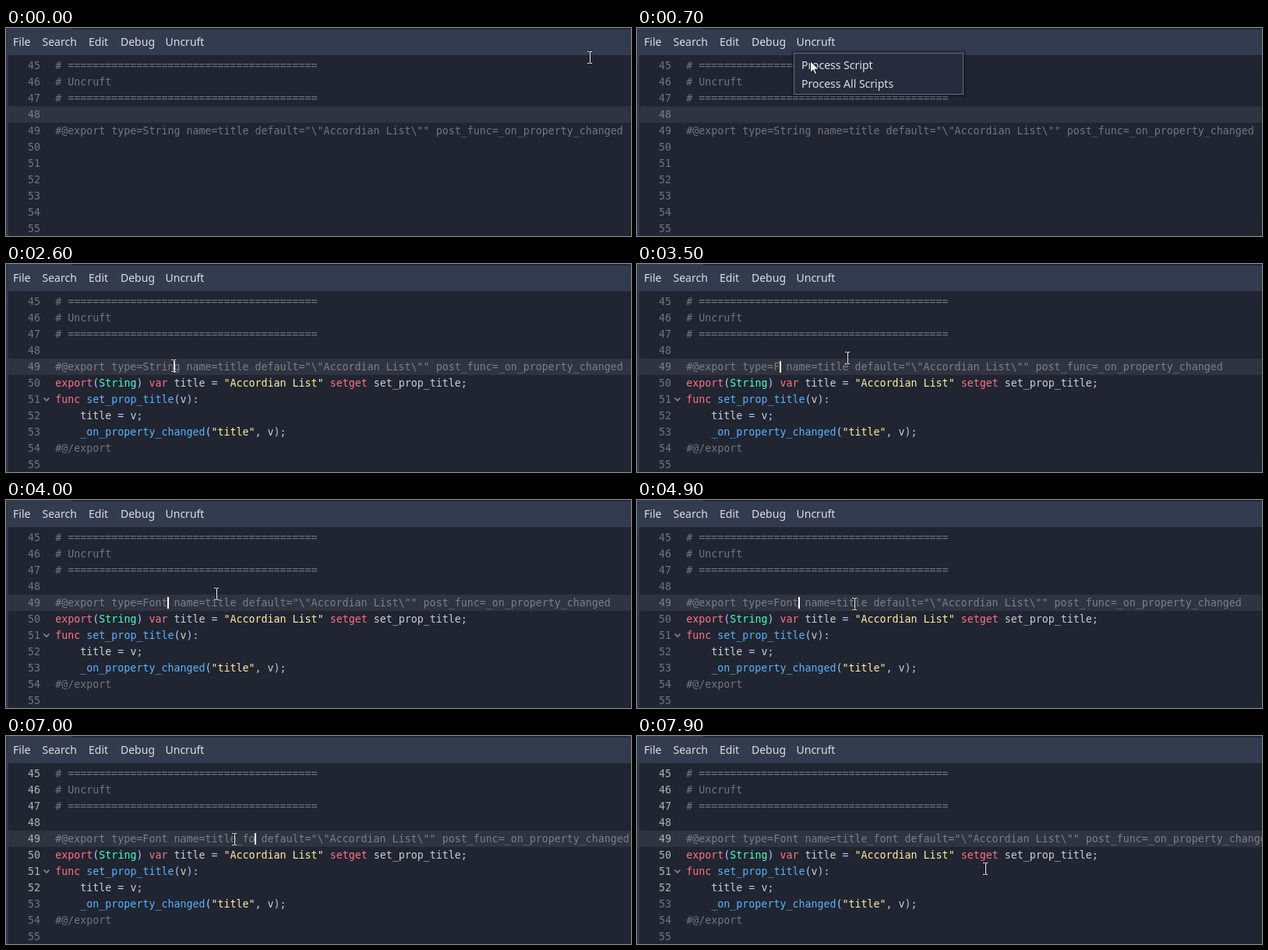
These frames come from a looping animation (802x268 px, 8000 ms). An HTML page:

```html
<!DOCTYPE html>
<html lang="en">
<head>
<meta charset="utf-8">
<title>Script editor</title>
<style>
  html, body { margin: 0; width: 100%; height: 100%; overflow: hidden; background: #202531; }
  svg { display: block; }
  text { white-space: pre; }
  .ui { font: 14px "Noto Sans", "Open Sans", sans-serif; fill: #dcdee3; }
  .code { font: 13.3px "DejaVu Sans Mono", "Liberation Mono", monospace; fill: #ccced3; }
  .num, .c { fill: #fff; fill-opacity: .37; }
  .safe { fill: #a0bca8; fill-opacity: 1; }
  .k { fill: #ff7085; }
  .t { fill: #42ffc2; }
  .f { fill: #57b3ff; }
  .s { fill: #ffeda1; }
  .y { fill: #abc9ff; }
</style>
</head>
<body>
<svg width="802" height="268" viewBox="0 0 802 268">
  <rect width="802" height="268" fill="#202531"/>
  <rect width="802" height="35" fill="#333b4f"/>
  <rect width="3" height="268" fill="#333b4f"/>
  <rect x="85" width="717" height="2" fill="#222834"/>
  <rect id="row" x="3" width="799" height="21" fill="#fff" fill-opacity=".07"/>
  <g id="marks">
    <rect x="175" y="122" width="48" height="21" fill="#699ce8" fill-opacity=".4"/>
    <rect x="119" y="143" width="48" height="21" fill="#fff" fill-opacity=".06"/>
  </g>
  <g class="ui">
    <text x="9" y="23">File</text>
    <text x="46.5" y="23">Search</text>
    <text x="106" y="23">Edit</text>
    <text x="147" y="23">Debug</text>
    <text x="204.5" y="23">Uncruft</text>
  </g>
  <g id="code" class="code"></g>
  <path id="fold" d="M48.5 172.5l3.5 3.5 3.5-3.5" fill="none" stroke="#858993" stroke-width="1.6"/>
  <rect id="caret" width="2" height="15" fill="#fff"/>
  <g id="popup" class="ui">
    <rect x="197" y="28" width="226" height="62" rx="3" fill="#000" fill-opacity=".12"/>
    <rect x="199" y="30" width="222" height="58" rx="2" fill="#000" fill-opacity=".15"/>
    <rect x="201.5" y="32.5" width="217" height="53" fill="#262c3b" stroke="#666c7b"/>
    <text x="211" y="53">Process Script</text>
    <text x="211" y="77">Process All Scripts</text>
  </g>
  <g id="mouse">
    <g id="beam" fill="none">
      <path d="M-3.5-7.5h7M-3.5 7.5h7M0-7.5v15" stroke="#14171f" stroke-opacity=".5" stroke-width="2.6"/>
      <path d="M-3-7.5h2.5M.5-7.5h2.5M-3 7.5h2.5M.5 7.5h2.5M.5-7v14" stroke="#f0f1f3"/>
    </g>
    <path id="arrow" d="M.5.5v15l3.5-3.3 2.4 5.3 2.3-1-2.4-5.2h4.8z" fill="#f0f1f3" stroke="#14171f"/>
  </g>
</svg>
<script>
const $ = id => document.getElementById(id);
const LEFT = 63, TOP = 38, ROW = 21, COL = 8, FIRST = 45;
const LOOP = 8000, TICK = 100, BLINK = 450;

// "k:func" becomes a coloured span; plain pieces keep the base colour
const paint = parts => parts.map(p => /^[a-z]:/.test(p)
  ? `<tspan class="${p[0]}">${p.slice(2)}</tspan>` : p).join("");

const rule = "c:# " + "=".repeat(40);
const source = [
  [rule], ["c:# Uncruft"], [rule], [], [],
  ["k:export", "y:(", "t:String", "y:)", " ", "k:var", " title ", "y:=", " ",
   's:"Accordian List"', " ", "k:setget", " set_prop_title", "y:;"],
  ["k:func", " ", "f:set_prop_title", "y:(", "v", "y:):"],
  ["    title ", "y:=", " v", "y:;"],
  ["    ", "f:_on_property_changed", "y:(", 's:"title"', "y:,", " v", "y:);"],
  ["c:#@/export"], []
];

function addText(x, line, cls, html) {
  const el = document.createElementNS("http://www.w3.org/2000/svg", "text");
  el.setAttribute("x", x);
  el.setAttribute("y", TOP + ROW * line + 15);
  el.setAttribute("class", cls);
  el.innerHTML = html;
  $("code").append(el);
  return el;
}

const numbers = source.map((_, i) => addText(28, i, "num", FIRST + i));
const lines = source.map((parts, i) => addText(LEFT + .3, i, "", paint(parts)));
const tag = lines[4];
tag.setAttribute("class", "c");

// Each edit types a word from a column on, one letter per key time
const typeEdit = { word: "Font", col: 14, keys: [3500, 3700, 3900, 3920] };
const nameEdit = { word: "_font", col: 29, keys: [6700, 6900, 7000, 7100, 7200] };
const typed = (edit, t) => edit.word.slice(0, edit.keys.filter(k => k <= t).length);

// Clicks and keys place the caret and restart its blinking: [time, column]
const clicks = [[1600, 0], [2500, 19], [2800, 20], [5800, 29], [6500, 29]];
const carets = [typeEdit, nameEdit]
  .flatMap(e => e.keys.map((k, i) => [k, e.col + i + 1]))
  .concat(clicks)
  .sort((a, b) => a[0] - b[0]);

// Pointer moves: start, end, x, y
const moves = [
  [0, 200, 470, 57], [200, 400, 212, 15], [500, 800, 226, 52],
  [1900, 2200, 241, 129], [2300, 2600, 215, 131], [2800, 3200, 270, 121],
  [4400, 4800, 279, 134], [4900, 5000, 287, 140], [5100, 5600, 293, 133],
  [7800, 7900, 447, 171]
];

function pointer(t) {
  let x = 749, y = 38;
  for (const [start, end, toX, toY] of moves) {
    const p = Math.min(1, Math.max(0, (t - start) / (end - start)));
    const ease = p * p * (3 - 2 * p);
    x += (toX - x) * ease;
    y += (toY - y) * ease;
  }
  return [Math.round(x), Math.round(y)];
}

const show = (el, on) => el.setAttribute("visibility", on ? "visible" : "hidden");

function draw(t) {
  const row = t < 2500 ? 3 : 4;
  $("row").setAttribute("y", TOP + ROW * row);

  const type = typed(typeEdit, t) || "String";
  tag.textContent = `#@export type=${type} name=title${typed(nameEdit, t)} ` +
    'default="\\"Accordian List\\"" post_func=_on_property_changed';

  const done = t >= 1400;
  lines.slice(5).forEach(el => show(el, done));
  show($("fold"), done);
  show($("marks"), t >= 2800 && t < 3500);
  numbers.forEach((el, i) => el.classList.toggle("safe", t >= 5900 && i < 8));

  const [since, col] = carets.findLast(c => c[0] <= t) || [t + 1, 0];
  show($("caret"), Math.floor((t - since) / BLINK) % 2 === 0);
  $("caret").setAttribute("x", LEFT + COL * col);
  $("caret").setAttribute("y", TOP + ROW * row + 3);

  const [x, y] = pointer(t);
  const open = t >= 700 && t < 1400;
  const arrow = open || y < 35;
  show($("popup"), open);
  show($("arrow"), arrow);
  show($("beam"), !arrow);
  $("mouse").setAttribute("transform", `translate(${x} ${y})`);
}

const start = performance.now();
let last = -1;
function frame() {
  const t = Math.floor((performance.now() - start) % LOOP / TICK) * TICK;
  if (t !== last) draw(last = t);
  requestAnimationFrame(frame);
}
frame();
</script>
</body>
</html>
```
